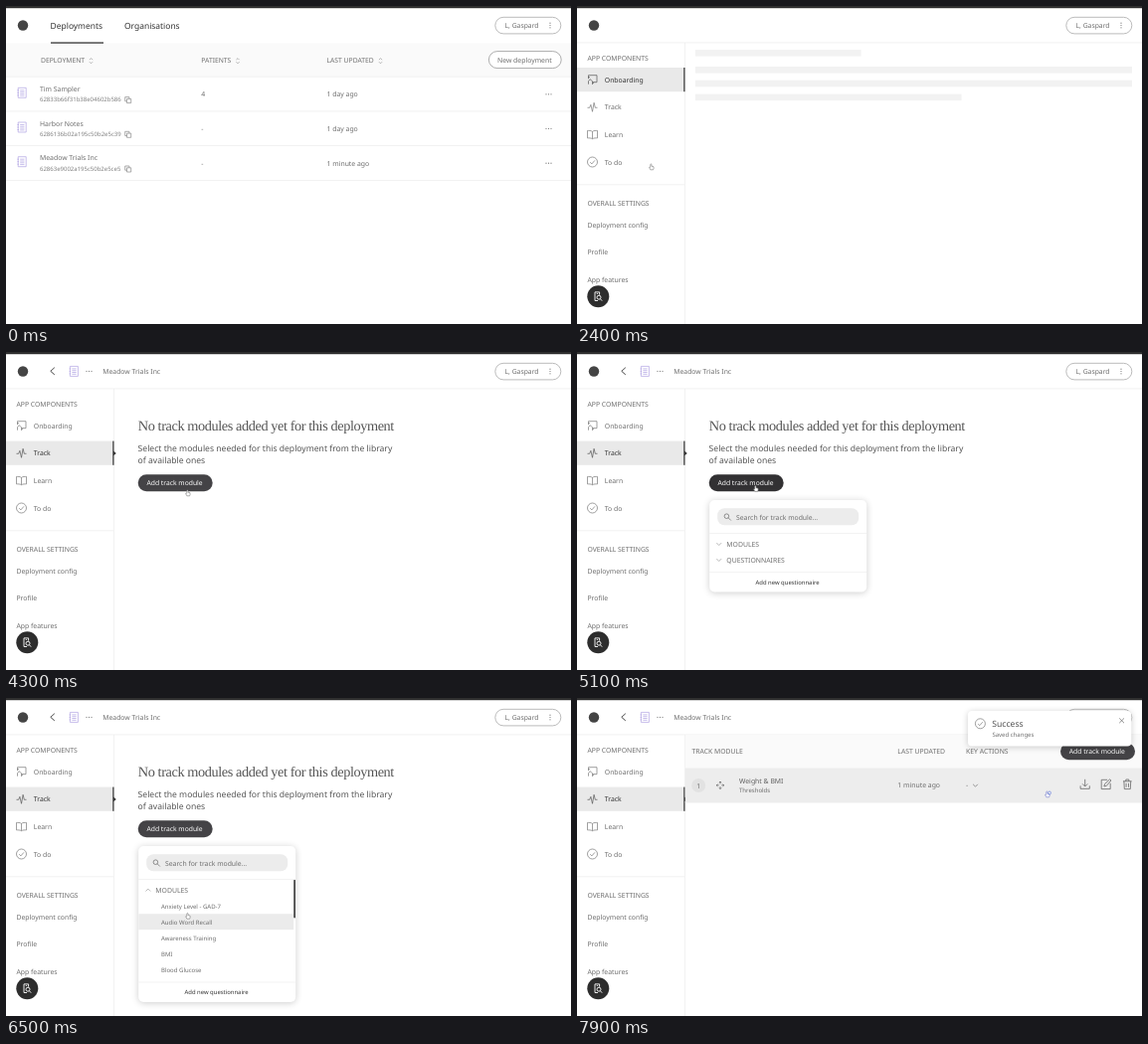
An HTML page with a canvas that plays this animation: 568 px wide and 320 px high, repeating every 8 s.

```html
<!DOCTYPE html>
<html lang="en">
<head>
<meta charset="utf-8">
<title>Deployment dashboard</title>
<style>
html, body { margin: 0; width: 100%; height: 100%; overflow: hidden; background: #fff; }
canvas { display: block; width: 568px; height: 320px; }
</style>
</head>
<body>
<canvas id="stage"></canvas>
<script>
const W = 568, H = 320, LOOP = 8000;
const canvas = document.getElementById('stage');
const dpr = window.devicePixelRatio || 1;
canvas.width = W * dpr;
canvas.height = H * dpr;
const c = canvas.getContext('2d');

const SANS = '"Noto Sans", "Open Sans", sans-serif';
const SERIF = '"Liberation Serif", "Times New Roman", serif';
const INK = '#333', GREY = '#6e6e6e', LINE = '#ececec', HOVER = '#ebebeb', LILAC = '#b0a4e2';
const ORG = 'Meadow Trials Inc';

const ICONS = {
  sort: 'M-1.6 -1L0 -2.6L1.6 -1M-1.6 1L0 2.6L1.6 1',
  copy: 'M-1.2 -1.2H3V3H-1.2ZM-1.2 1.2H-3V-3H1.2V-1.2',
  doc: 'M-4 -5H4V5H-4ZM-2 -2.5H2.2M-2 -.7H2.2M-2 1.1H2.2M-2 2.9H2.2M-4.8 -2.5H-3.2M-4.8 0H-3.2M-4.8 2.5H-3.2',
  onboard: 'M-4 -4.5H4.5V2.5H0M-4 -4.5V-1M-4 4.5V1.5L-2.5 -.5L0 1.5V4.5M-4.5 -2.5H-2.5M1.5 2.5L0 4.5',
  pulse: 'M-5 .5H-2.8L-1.6 -2.5L0 4.5L1.6 -4.5L2.8 .5H5',
  book: 'M0 -3C-1.5 -4.2 -3.5 -4 -5 -4V3.5C-3.5 3.5 -1.5 3.3 0 4.3C1.5 3.3 3.5 3.5 5 3.5V-4C3.5 -4 1.5 -4.2 0 -3V4.3',
  check: 'M5 0A5 5 0 1 1 -5 0A5 5 0 1 1 5 0M-2.3 .2L-.6 1.9L2.4 -1.6',
  phone: 'M-3 -4.3H1.6V-1.5M-3 -4.3V4.3H0M-1.2 -2.8H0M3 1A2 2 0 1 1 -1 1A2 2 0 1 1 3 1M2.4 2.5L4.2 4.5',
  back: 'M2 -3.6L-2 0L2 3.6',
  search: 'M1.4 -.8A2.3 2.3 0 1 1 -3.2 -.8A2.3 2.3 0 1 1 1.4 -.8M.8 .8L3.5 3.5',
  up: 'M-2.4 1.2L0 -1.2L2.4 1.2',
  down: 'M-2.4 -1.2L0 1.2L2.4 -1.2',
  close: 'M-2.4 -2.4L2.4 2.4M2.4 -2.4L-2.4 2.4',
  move: 'M0 -3.6V-1.4M0 3.6V1.4M-3.6 0H-1.4M3.6 0H1.4M-1 -2.6L0 -3.8L1 -2.6M-1 2.6L0 3.8L1 2.6M-2.6 -1L-3.8 0L-2.6 1M2.6 -1L3.8 0L2.6 1',
  load: 'M0 -5V2M-2.6 -.4L0 2.2L2.6 -.4M-4.6 1.5V4.5H4.6V1.5',
  edit: 'M1.5 -4.5H-4.5V4.8H4.5V-1M-1.8 2.2L-1.2 -.2L4 -5L5.2 -3.8L.6 1.6Z',
  trash: 'M-4.3 -3H4.3M-1.5 -3V-4.8H1.5V-3M-3.4 -3L-3 4.8H3L3.4 -3M-1.2 -1V3M1.2 -1V3',
  hand: 'M-1.2 2.8L-2.4 .4L-1.2 .2V-2.6Q-.6 -3.4 0 -2.6V-.8L2 -.3Q2.4 1.5 1.6 2.8Z'
};
for (const k in ICONS) ICONS[k] = new Path2D(ICONS[k]);

// time, x, y
const CURSOR = [
  [2000, 75, 162], [2900, 75, 162], [3500, 49.5, 103.5], [4000, 49.5, 103.5],
  [4300, 183, 142], [4700, 180, 137.5], [5100, 180, 137.5], [5800, 174, 195],
  [6200, 174, 195], [6900, 197, 257], [7300, 197, 257], [7900, 473, 97]
];

const clamp = v => Math.max(0, Math.min(1, v));
const ramp = (t, a, b) => clamp((t - a) / (b - a));
const ease = p => p * p * (3 - 2 * p);

function cursorAt(t) {
  for (let i = 1; i < CURSOR.length; i++) {
    const [t0, x0, y0] = CURSOR[i - 1], [t1, x1, y1] = CURSOR[i];
    if (t <= t1) {
      const p = ease(ramp(t, t0, t1));
      return [x0 + (x1 - x0) * p, y0 + (y1 - y0) * p];
    }
  }
  return CURSOR[CURSOR.length - 1].slice(1);
}

function text(s, x, y, size = 6.86, color = GREY, weight = 400, font = SANS, spacing = 0) {
  c.font = `${weight} ${size}px ${font}`;
  c.letterSpacing = spacing + 'px';
  c.fillStyle = color;
  c.fillText(s, x, y);
}

function rect(x, y, w, h, color) {
  c.fillStyle = color;
  c.fillRect(x, y, w, h);
}

function round(x, y, w, h, r, fill, stroke, lw = 0.8) {
  c.beginPath();
  c.roundRect(x, y, w, h, r);
  if (fill) { c.fillStyle = fill; c.fill(); }
  if (stroke) { c.strokeStyle = stroke; c.lineWidth = lw; c.stroke(); }
}

function disc(x, y, r, color) {
  c.beginPath();
  c.arc(x, y, r, 0, 7);
  c.fillStyle = color;
  c.fill();
}

function icon(name, x, y, color = GREY, lw = 0.7, fill) {
  c.save();
  c.translate(x, y);
  if (fill) { c.fillStyle = fill; c.fill(ICONS[name]); }
  c.strokeStyle = color;
  c.lineWidth = lw;
  c.stroke(ICONS[name]);
  c.restore();
}

function dots(x, y, dx, dy, color = GREY) {
  for (let i = -1; i < 2; i++) disc(x + dx * i, y + dy * i, 0.6, color);
}

function panel(x, y, w, h, r, blur) {
  c.save();
  c.shadowColor = 'rgba(0,0,0,.2)';
  c.shadowBlur = blur * dpr;
  c.shadowOffsetY = dpr;
  round(x, y, w, h, r, '#fff');
  c.restore();
}

function fade(alpha, draw) {
  if (alpha <= 0) return;
  c.save();
  c.globalAlpha = alpha;
  draw();
  c.restore();
}

function header() {
  disc(17, 19.5, 5.2, '#444');
  round(491.8, 11.3, 66, 16.6, 8.3, '#fff', '#aaa');
  text('L, Gaspard', 501.5, 22, 6.8);
  dots(547, 19.5, 0, 2.3);
}

function listPage(t) {
  text('Deployments', 44.6, 23.3, 8.45, INK, 500);
  text('Organisations', 119, 23.3, 8.45, INK, 500);
  rect(0, 37.5, W, 33.5, '#fafafa');
  rect(45, 36.4, 53, 1.3, INK);
  [['DEPLOYMENT', 35, 85.5], ['PATIENTS', 196.3, 233], ['LAST UPDATED', 322.5, 376.5]].forEach(([s, x, sx]) => {
    text(s, x, 57.2, 6.78);
    icon('sort', sx, 55.2, '#888', 0.6);
  });
  round(485.4, 45.6, 72.8, 17, 8.5, '#fff', '#999');
  text('New deployment', 494, 56.8);

  const rows = [
    ['Tim Sampler', '62833b66f31b38e04602b586', '4', '1 day ago'],
    ['Harbor Notes', '6286136b02a195c50b2e5c39', '-', '1 day ago'],
    [ORG, '62863e9002a195c50b2e5ce5', '-', '1 minute ago']
  ];
  rows.forEach(([name, id, count, when], i) => {
    const y = 71.3 + i * 34.7;
    if (i === 2 && t >= 1400) rect(0, y - 0.4, W, 34.9, HOVER);
    icon('doc', 16.2, y + 16, LILAC);
    text(name, 34, y + 14.7);
    text(id, 34, y + 25.1, 6, '#808080');
    icon('copy', 122.7, y + 23.3, '#888', 0.7);
    text(count, 196.3, y + 20);
    text(when, 322.5, y + 20);
    dots(545.5, y + 17.5, 2.5, 0);
    rect(0, y + 34.3, W, 0.7, LINE);
  });
  rect(0, 70.8, W, 0.7, LINE);
}

function sidebar(t) {
  const swap = ramp(t, 3700, 3900);
  const hover = t >= 3400 ? 0.3 : 0;
  rect(0, 36.6, W, 0.7, LINE);
  rect(108.1, 37, 0.7, H - 37, LINE);
  text('APP COMPONENTS', 10.4, 54.5, 6.84);
  const items = [['Onboarding', 'onboard'], ['Track', 'pulse'], ['Learn', 'book'], ['To do', 'check']];
  items.forEach(([name, art], i) => {
    const y = 74.2 + i * 27.6;
    const on = i === 0 ? 1 - swap : i === 1 ? swap : 0;
    fade(Math.max(on, i === 1 ? hover : 0), () => rect(0, y - 12.2, 108, 24.2, '#e9e9e9'));
    fade(on, () => rect(107.3, y - 12.2, 1.2, 24.2, INK));
    icon(art, 15.5, y, on > 0.5 ? '#555' : '#777');
    text(name, 27.8, y + 2.5, 6.84, on > 0.5 ? INK : GREY, on > 0.5 ? 500 : 400);
  });
  if (swap > 0) {
    c.beginPath();
    c.moveTo(108, 99.5);
    c.lineTo(110.8, 101.9);
    c.lineTo(108, 104.3);
    c.fillStyle = INK;
    c.fill();
  }
  rect(0, 179.5, 108, 0.7, LINE);
  text('OVERALL SETTINGS', 10.4, 200.8, 6.84);
  text('Deployment config', 10.4, 222.8);
  text('Profile', 10.4, 250.2);
  text('App features', 10.4, 277.9);
  disc(21.3, 292.2, 11, '#2d2d2d');
  icon('phone', 21, 292.2, '#fff', 0.9);
}

function breadcrumb() {
  icon('back', 46.8, 19.3, INK, 0.9);
  icon('doc', 68.4, 19.4, LILAC);
  dots(83.5, 19.3, 2.5, 0);
  text(ORG, 97.2, 21.9);
}

function skeleton() {
  [[44, 166.5], [61, 439], [74.7, 439], [88.6, 267.5]].forEach(([y, w]) => rect(119, y, w, 6.6, '#f2f2f2'));
}

function darkButton(x, y, hot) {
  round(x, y, 75, 17, 8.5, hot ? '#323133' : '#444346');
  text('Add track module', x + 8.8, y + 11, 6.75, '#fff', 500);
}

function emptyState(t) {
  text('No track modules added yet for this deployment', 132.8, 78.6, 14.3, '#555', 400, SERIF, -0.41);
  text('Select the modules needed for this deployment from the library', 132.6, 99.8, 8.58, '#555');
  text('of available ones', 132.6, 111.8, 8.58, '#555');
  darkButton(132.7, 123.2, t >= 4400 && t < 6100);
}

function popover(t, cy) {
  const open = ramp(t, 6000, 6200);
  const h = 92.5 + 64.5 * open;
  panel(133.2, 149, 158, h, 5, 7);
  round(141.2, 157.3, 142, 17, 7, '#ececec');
  icon('search', 151.3, 166, '#666', 0.7);
  text('Search for track module...', 160, 168.5, 6.84);
  rect(133.2, 182.2, 158, 0.6, LINE);
  const foot = 149 + h - 20.3;
  c.save();
  c.beginPath();
  c.rect(133.2, 183, 158, foot - 183);
  c.clip();
  icon(open ? 'up' : 'down', 142.8, 193.3, '#888', 0.6);
  text('MODULES', 150.3, 195.8, 6.86);
  if (open) {
    ['Anxiety Level - GAD-7', 'Audio Word Recall', 'Awareness Training', 'BMI', 'Blood Glucose'].forEach((s, i) => {
      const y = 209.4 + i * 16;
      if (t > 6200 && Math.abs(cy - y) < 8) rect(133.2, y - 8.2, 156, 16, HOVER);
      text(s, 156, y + 2.3, 6.03);
    });
    round(289.2, 182.8, 1.8, 38.6, 0.9, '#4a4a4a');
  } else {
    icon('down', 142.8, 209.3, '#888', 0.6);
    text('QUESTIONNAIRES', 150.3, 211.8, 6.86);
  }
  c.restore();
  rect(133.2, foot, 158, 0.6, LINE);
  text('Add new questionnaire', 179.5, foot + 12.4, 5.92, INK, 500);
}

function modulePage(t) {
  rect(108.8, 37.3, W - 108.8, 33.5, '#fafafa');
  text('TRACK MODULE', 115.4, 56.4, 6.84);
  text('LAST UPDATED', 322.3, 56.4, 6.84);
  text('KEY ACTIONS', 391, 56.4, 6.84);
  darkButton(486, 45.3, false);
  if (t >= 7700) rect(108.8, 70.8, W - 108.8, 34.3, '#ededed');
  rect(108.8, 70.6, W - 108.8, 0.6, LINE);
  rect(108.8, 104.8, W - 108.8, 0.6, LINE);
  disc(122.2, 88, 7, '#e2e2e2');
  text('1', 120.2, 90.5);
  icon('move', 144, 87.8, '#666', 0.8);
  text('Weight & BMI', 163, 86, 6.86, '#606060');
  text('Thresholds', 163, 95.4, 6.03);
  text('1 minute ago', 322.3, 90.4);
  text('-', 391, 90.4);
  icon('down', 400.5, 88, GREY, 0.7);
  icon('load', 510.7, 86.8, '#666', 0.8);
  icon('edit', 531.7, 86.8, '#666', 0.8);
  icon('trash', 553.3, 86.8, '#666', 0.8);
}

function toast() {
  panel(393, 13, 164.3, 35.4, 4, 6);
  icon('check', 405.4, 25.8, '#777', 0.7);
  text('Success', 417.2, 28.8, 8.65, '#555');
  text('Saved changes', 417.4, 39.2, 6);
  icon('close', 547.6, 22.8, '#666', 0.7);
}

function draw(t) {
  c.setTransform(dpr, 0, 0, dpr, 0, 0);
  c.textRendering = 'geometricPrecision';
  const [cx, cy] = cursorAt(t);
  rect(0, 0, W, H, '#fff');
  rect(0, 0, W, 2.2, '#303030');
  header();
  if (t < 2400) {
    listPage(t);
  } else {
    sidebar(t);
    if (t >= 4100) breadcrumb();
    if (t < 3800) skeleton();
    else if (t < 7400) fade(ramp(t, 3700, 3900), () => emptyState(t));
    else modulePage(t);
    if (t < 7400) fade(ramp(t, 4900, 5100) * (1 - ramp(t, 7200, 7400)), () => popover(t, cy));
    fade(ramp(t, 7400, 7800), toast);
  }
  if (t >= 2000) {
    const busy = t >= 7800;
    icon('hand', cx, cy, busy ? '#6f78c8' : '#777', 0.6, '#fff');
    if (busy) {
      c.beginPath();
      c.arc(cx + 2, cy - 1.5, 1.5, 0, 7);
      c.strokeStyle = '#6f86e0';
      c.lineWidth = 0.7;
      c.stroke();
    }
  }
}

const start = performance.now();
function frame() {
  const t = (performance.now() - start) % LOOP;
  draw(Math.floor(t / 100) * 100);
  requestAnimationFrame(frame);
}
frame();
</script>
</body>
</html>
```
